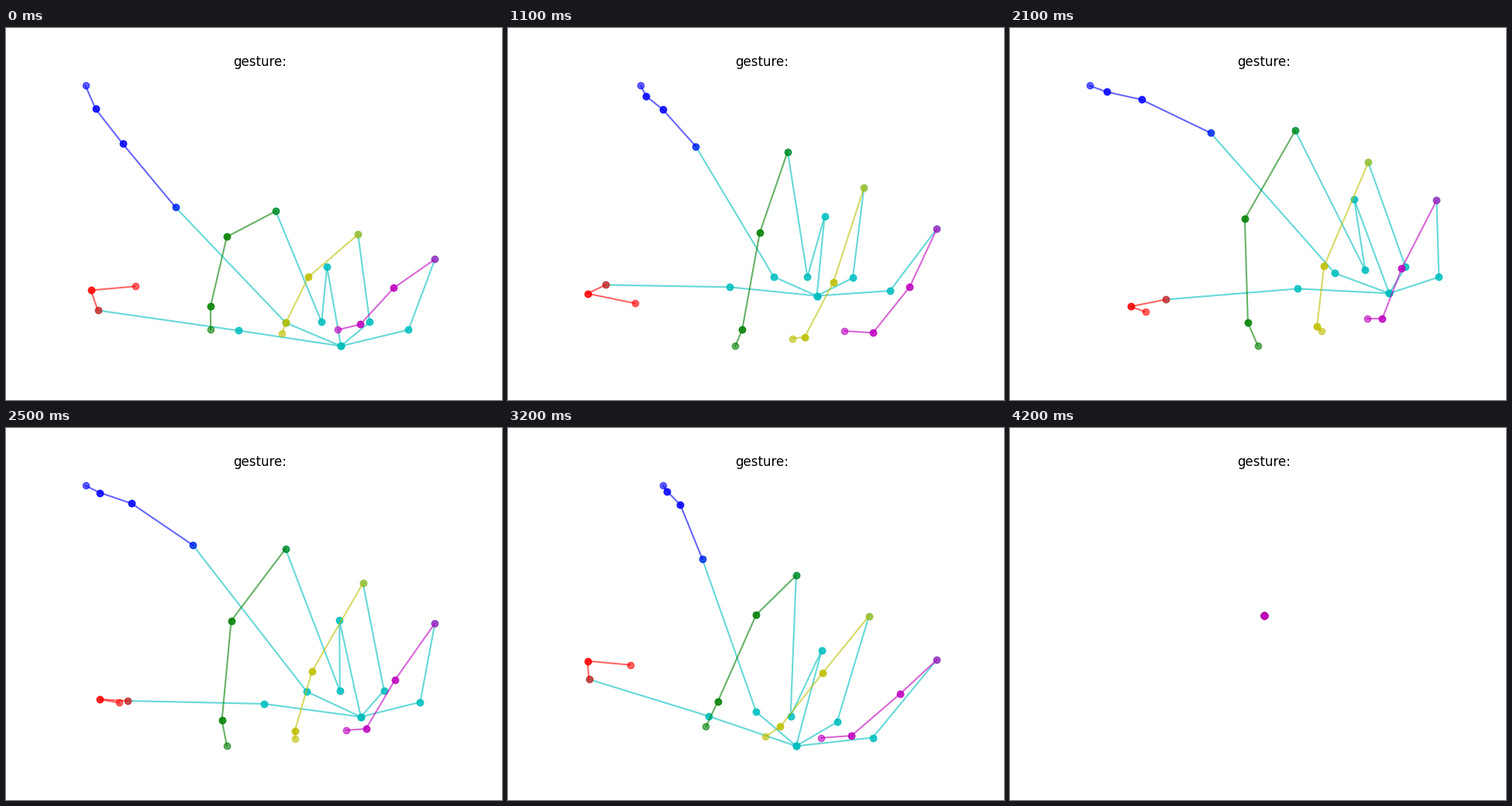
These frames come from a looping animation (640x480 px, 9000 ms). A matplotlib script:

```python
import numpy as np
import matplotlib.pyplot as plt
from matplotlib.animation import FuncAnimation

STEP_MS = 100
FRAMES = 90
MOVING = 42  # frames before the hand collapses to a point

# Key poses of the hand: one row per time, x and y pairs from base to tip.
times = [0, 6, 16, 21, 29, 36]
palm = [
    [432, 410, 414, 308],
    [394, 367, 400, 269],
    [427, 340, 422, 227],
    [489, 342, 444, 221],
    [403, 406, 413, 280],
    [342, 410, 400, 289],
]
thumb = [
    [300, 390, 119, 364, 110, 338, 167, 333],
    [275, 357, 112, 355, 103, 356, 167, 361],
    [312, 327, 143, 323, 103, 336, 152, 351],
    [371, 336, 201, 350, 156, 359, 175, 366],
    [284, 374, 120, 342, 103, 327, 144, 331],
    [240, 365, 103, 301, 119, 268, 190, 275],
]
index = [
    [361, 380, 219, 231, 151, 149, 116, 104, 103, 74],
    [334, 343, 221, 192, 176, 132, 153, 99, 146, 74],
    [367, 313, 252, 127, 194, 85, 165, 79, 153, 74],
    [419, 316, 259, 135, 170, 92, 125, 82, 103, 74],
    [344, 365, 244, 166, 196, 100, 170, 83, 160, 74],
    [301, 363, 269, 169, 264, 96, 258, 79, 258, 74],
]
middle = [
    [407, 379, 348, 236, 285, 269, 264, 359, 264, 389],
    [380, 342, 346, 195, 316, 275, 295, 386, 285, 410],
    [409, 313, 368, 135, 313, 252, 295, 387, 294, 410],
    [458, 312, 368, 132, 303, 246, 307, 380, 320, 410],
    [388, 369, 366, 183, 303, 250, 266, 371, 259, 405],
    [344, 370, 384, 194, 350, 228, 289, 330, 265, 359],
]
ring = [
    [469, 379, 454, 266, 390, 321, 361, 380, 356, 394],
    [441, 341, 452, 232, 416, 332, 379, 397, 362, 402],
    [466, 315, 463, 186, 410, 320, 380, 397, 372, 399],
    [510, 308, 462, 173, 405, 307, 396, 385, 402, 391],
    [447, 374, 463, 234, 397, 323, 354, 397, 342, 410],
    [403, 380, 471, 247, 423, 305, 357, 369, 330, 381],
]
pinky = [
    [519, 389, 553, 298, 500, 335, 457, 382, 428, 389],
    [492, 354, 553, 274, 519, 338, 471, 392, 432, 393],
    [512, 333, 553, 245, 510, 327, 468, 391, 438, 388],
    [553, 321, 550, 222, 505, 310, 480, 375, 461, 375],
    [494, 393, 553, 291, 501, 345, 447, 404, 413, 407],
    [446, 401, 553, 302, 514, 337, 444, 385, 401, 387],
]

keys = np.hstack([palm, thumb, index, middle, ring, pinky]).astype(float)
# The last turn slows down before the hand vanishes.
keys = np.vstack([keys, keys[-1] + 0.2 * (keys[-1] - keys[-2])])
times = np.array(times + [MOVING - 1], float)
slopes = np.gradient(keys, times, axis=0)

# Bones: cyan ones first, then each finger in its own colour.
WRIST, PALM = 0, 1
fingers = [(2, 4, "r"), (6, 5, "b"), (11, 5, "g"), (16, 5, "y"), (21, 5, "m")]
bones = [(WRIST, PALM, "c")]
for first, size, color in fingers:
    root = PALM if color == "g" else WRIST
    bones += [(root, first, "c"), (first, first + 1, "c")]
for first, size, color in fingers:
    bones += [(j, j + 1, color) for j in range(first + 1, first + size - 1)]

fig, ax = plt.subplots(figsize=(6.4, 4.8), dpi=100)
ax.set_xlim(80, 576)
ax.set_ylim(427.2, 57.6)
ax.axis("off")
ax.set_title("gesture:")
lines = [ax.plot([], [], "o-", color=c, alpha=0.6)[0] for _, _, c in bones]

BOX_LO = np.array([102.55, 74.4])
BOX_HI = np.array([553.45, 410.4])


def pose(frame):
    """Joint positions, stretched to fill the box."""
    if frame >= MOVING:
        return np.tile((BOX_LO + BOX_HI) / 2, (keys.shape[1] // 2, 1))
    i = min(np.searchsorted(times, frame, side="right") - 1, len(times) - 2)
    span = times[i + 1] - times[i]
    u = (frame - times[i]) / span
    flat = ((1 + 2 * u) * (1 - u) ** 2 * keys[i]
            + u * (1 - u) ** 2 * span * slopes[i]
            + u ** 2 * (3 - 2 * u) * keys[i + 1]
            + u ** 2 * (u - 1) * span * slopes[i + 1])
    pts = flat.reshape(-1, 2)
    lo, hi = pts.min(axis=0), pts.max(axis=0)
    return BOX_LO + (pts - lo) / (hi - lo) * (BOX_HI - BOX_LO)


def draw(frame):
    pts = pose(frame)
    for line, (a, b, _) in zip(lines, bones):
        line.set_data(pts[[a, b], 0], pts[[a, b], 1])
    return lines


anim = FuncAnimation(fig, draw, frames=FRAMES, interval=STEP_MS,
                     repeat=True, repeat_delay=0)
plt.show()
```
